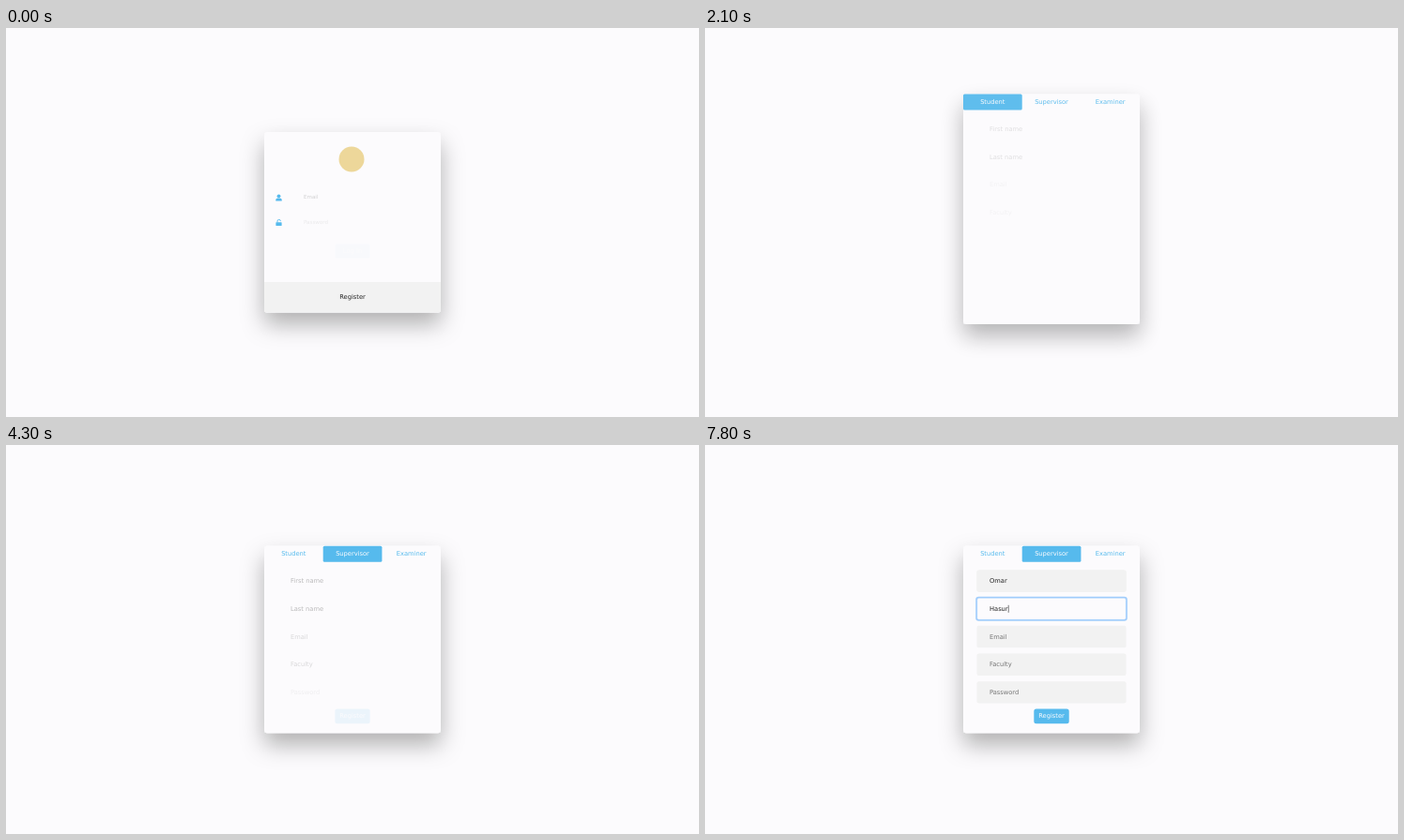
An HTML page that plays this animation: 738x415 px, repeating every 8000 ms.

```html
<!DOCTYPE html>
<html lang="en">
<head>
<meta charset="utf-8">
<title>Register form</title>
<style>
  html, body { margin: 0; width: 100%; height: 100%; overflow: hidden; background: #fcfbfd; }
  svg { display: block; width: 100vw; height: 100vh; }
  text { font: 6.7px "DejaVu Sans", sans-serif; text-rendering: geometricPrecision; dominant-baseline: central; }
  .mid { text-anchor: middle; }
  .small { font-size: 5.57px; }
  .hint { fill: #757575; }
  .typed { fill: #222; }
  .blue { fill: #56baed; }
  .card { fill: #fcfbfd; }
  .grey { fill: #f2f2f2; }
  .light { fill: #fcfbfd; }
  #status text { font-size: 4.8px; fill: #e4e4e4; }
</style>
</head>
<body>
<svg id="stage" viewBox="0 0 738 415" preserveAspectRatio="none">
  <defs>
    <filter id="shadow" filterUnits="userSpaceOnUse" x="215" y="-60" width="308" height="500">
      <feDropShadow dx="0" dy="12.5" stdDeviation="12.5" flood-color="#000" flood-opacity=".3"/>
    </filter>
  </defs>
  <g id="login"></g>
  <g id="student"></g>
  <g id="supervisor"></g>
  <g id="status">
    <rect y="405.5" width="98.5" height="9.5" fill="#323236"/>
    <text x="1.2" y="410.4"></text>
  </g>
</svg>
<script>
const LOOP = 8000;
const LOGIN_AT = -1100, LOGIN_END = 1300;
const STUDENT_AT = 1300, DROP_AT = 1400, TAB_AT = 3250;
const STEP = [0, 400, 600, 800, 1000];
const TABS = ["Student", "Supervisor", "Examiner"];

const $ = id => document.getElementById(id);
const clamp = v => Math.min(1, Math.max(0, v));
const ramp = (t, from, to) => clamp((t - from) / (to - from));

function bezier(x1, y1, x2, y2) {
  const at = (a, b, s) => 3 * (1 - s) ** 2 * s * a + 3 * (1 - s) * s * s * b + s ** 3;
  return x => {
    if (x <= 0 || x >= 1) return clamp(x);
    let lo = 0, hi = 1;
    for (let i = 0; i < 24; i++) {
      const s = (lo + hi) / 2;
      if (at(x1, x2, s) < x) lo = s; else hi = s;
    }
    return at(y1, y2, lo);
  };
}
const ease = bezier(.25, .1, .25, 1);
const easeIn = bezier(.42, 0, 1, 1);

// Markup helpers
const rect = (x, y, w, h, cls, extra = "") =>
  `<rect x="${x}" y="${y}" width="${w}" height="${h}" class="${cls}" ${extra}/>`;
const label = (x, y, str, cls) => `<text x="${x}" y="${y}" class="${cls}">${str}</text>`;
const fade = (start, body) => `<g data-fade="${start}">${body}</g>`;
const card = (y, h) => rect(275, y, 188, h, "card", 'rx="3.5" filter="url(#shadow)"');
const button = (y, str) =>
  rect(350.3, y - 7.8, 37.4, 15.6, "blue", 'rx="2.5"') + label(369, y, str, "mid light");

function input(x, y, w, h, str, start, cls = "hint") {
  return rect(x, y - h / 2, w, h, "grey", `rx="2" data-back="${start}"`) +
    fade(start, label(x + 13.5, y, str, cls));
}

function tabs(y, active) {
  return TABS.map((name, i) => {
    const on = i === active;
    return (on ? rect(275 + i * 62.7, y, 62.7, 17, "blue", 'rx="1.5"') : "") +
      label(306.3 + i * 62.7, y + 8.5, name, on ? "mid light" : "mid blue");
  }).join("");
}

const fields = (top, base, list) => list.map(([str, step], i) =>
  input(289.5, top + 37.4 + i * 29.7, 159, 23.4, str, base + STEP[step])).join("");

$("login").innerHTML = card(111, 192.5) +
  '<path class="grey" d="M275 271h188v29a3.5 3.5 0 0 1-3.5 3.5h-181a3.5 3.5 0 0 1-3.5-3.5z"/>' +
  label(369, 287, "Register", "mid typed") +
  fade(LOGIN_AT + STEP[1], '<circle cx="368" cy="140" r="13.5" fill="#e0ba4c"/>') +
  '<g class="blue"><circle cx="290.5" cy="179.3" r="1.9"/>' +
  '<path d="M287.3 184.6v-1.2q0-2 2-2h2.4q2 0 2 2v1.2z"/>' +
  '<rect x="287.4" y="207.2" width="6.2" height="3.8" rx=".6"/>' +
  '<path d="M289 207.4v-1.3a1.7 1.7 0 0 1 3.4 0" fill="none" stroke="#56baed" stroke-width=".9"/></g>' +
  input(303.5, 181.3, 111, 20, "Email", LOGIN_AT + STEP[2], "hint small") +
  input(303.5, 208, 111, 20, "Password", LOGIN_AT + STEP[3], "hint small") +
  fade(LOGIN_AT + STEP[4], button(238, "Log In"));

$("student").innerHTML = card(85, 245.5) + tabs(85, 0) + '<g id="pane">' +
  fields(85, STUDENT_AT, [["First name", 1], ["Last name", 1], ["Email", 2],
    ["Faculty", 2], ["Address", 3], ["Password", 3]]) +
  fade(STUDENT_AT + STEP[4],
    rect(361, 286.8, 51, 15, "light", 'rx="2" stroke="#8a9096" stroke-width=".6"') +
    rect(325.5, 286.5, 36, 15.6, "", 'rx="2" fill="#545b62"') +
    label(343.3, 294.2, "QELian", "mid light") +
    label(386.5, 294.2, "Non-QELian", "mid hint") +
    button(312.2, "Register")) + "</g>";

$("supervisor").innerHTML = card(107.7, 199.5) + tabs(107.7, 1) +
  fields(107.7, TAB_AT, [["First name", 1], ["Last name", 1], ["Email", 2],
    ["Faculty", 2], ["Password", 3]]) +
  fade(TAB_AT + STEP[3], button(289.4, "Register")) +
  '<g id="entries"></g>';

// Typed fields: focus span and one time per letter
const entries = [
  { y: 145.1, str: "Omar", on: 5350, off: 6550, keys: [5800, 6000, 6100, 6300] },
  { y: 174.8, str: "Hasur", on: 6550, off: LOOP + 200, keys: [7200, 7300, 7500, 7600, 7800] }
];

for (const e of entries) {
  const g = document.createElementNS("http://www.w3.org/2000/svg", "g");
  g.innerHTML = rect(289.5, e.y - 11.7, 159, 23.4, "grey", 'rx="2"') +
    '<g>' + rect(289.1, e.y - 12.1, 159.8, 24.2, "light", 'rx="2.4" stroke="#a3cefb" stroke-width="1.8"') +
    rect(289.7, e.y - 11.5, 158.6, 23, "light", 'rx="2" stroke="#80bdff" stroke-width=".4"') + '</g>' +
    label(303, e.y, "First name", "hint") + label(303, e.y, "", "typed") +
    rect(303, e.y - 4, .6, 8, "typed");
  $("entries").append(g);
  [e.back, e.ring, e.hint, e.text, e.caret] = g.children;
  e.hint.textContent = e === entries[0] ? "First name" : "Last name";
  e.group = g;
}

const show = (el, on) => el.setAttribute("display", on ? "inline" : "none");
const alpha = (el, v) => el.setAttribute("opacity", v.toFixed(3));
const faders = [...document.querySelectorAll("[data-fade]")];
const backs = [...document.querySelectorAll("[data-back]")];

function drawEntry(e, t) {
  show(e.group, t >= e.on);
  const n = e.keys.filter(k => t >= k).length;
  e.text.textContent = e.str.slice(0, n);
  show(e.hint, n === 0);
  alpha(e.ring, ramp(t, e.on, e.on + 150) * (1 - ramp(t, e.off, e.off + 150)));
  show(e.caret, t < e.off);
  e.caret.setAttribute("x", 303.2 + (n && t >= e.on ? e.text.getComputedTextLength() : 0));
}

function drawStatus(t) {
  const first = t < 2000;
  const path = "localhost:8080/register" + (first ? "" : "#pills-supervisor");
  const [bar, text] = $("status").children;
  text.textContent = path;
  bar.setAttribute("width", first ? 58 : 98.5);
  alpha($("status"), first
    ? ramp(t, 700, 800) * (1 - ramp(t, 1300, 1400))
    : ramp(t, 2650, 2750) * (1 - ramp(t, 3600, 3900)));
}

function draw(t) {
  show($("login"), t < LOGIN_END);
  show($("student"), t >= DROP_AT && t < TAB_AT);
  show($("supervisor"), t >= TAB_AT);

  const drop = ease((t - DROP_AT) / 1000);
  $("student").setAttribute("transform", `translate(0 ${(-245.5 * (1 - drop)).toFixed(2)})`);
  alpha($("student"), drop);
  alpha($("pane"), 1 - ramp(t, TAB_AT - 150, TAB_AT));

  for (const el of faders) alpha(el, easeIn((t - el.dataset.fade) / 1000));
  for (const el of backs) alpha(el, ramp(easeIn((t - el.dataset.back) / 1000), .85, 1));
  for (const e of entries) drawEntry(e, t);
  drawStatus(t);
}

const begin = performance.now();
function tick() {
  draw((performance.now() - begin) % LOOP);
  requestAnimationFrame(tick);
}
draw(0);
requestAnimationFrame(tick);
</script>
</body>
</html>
```
